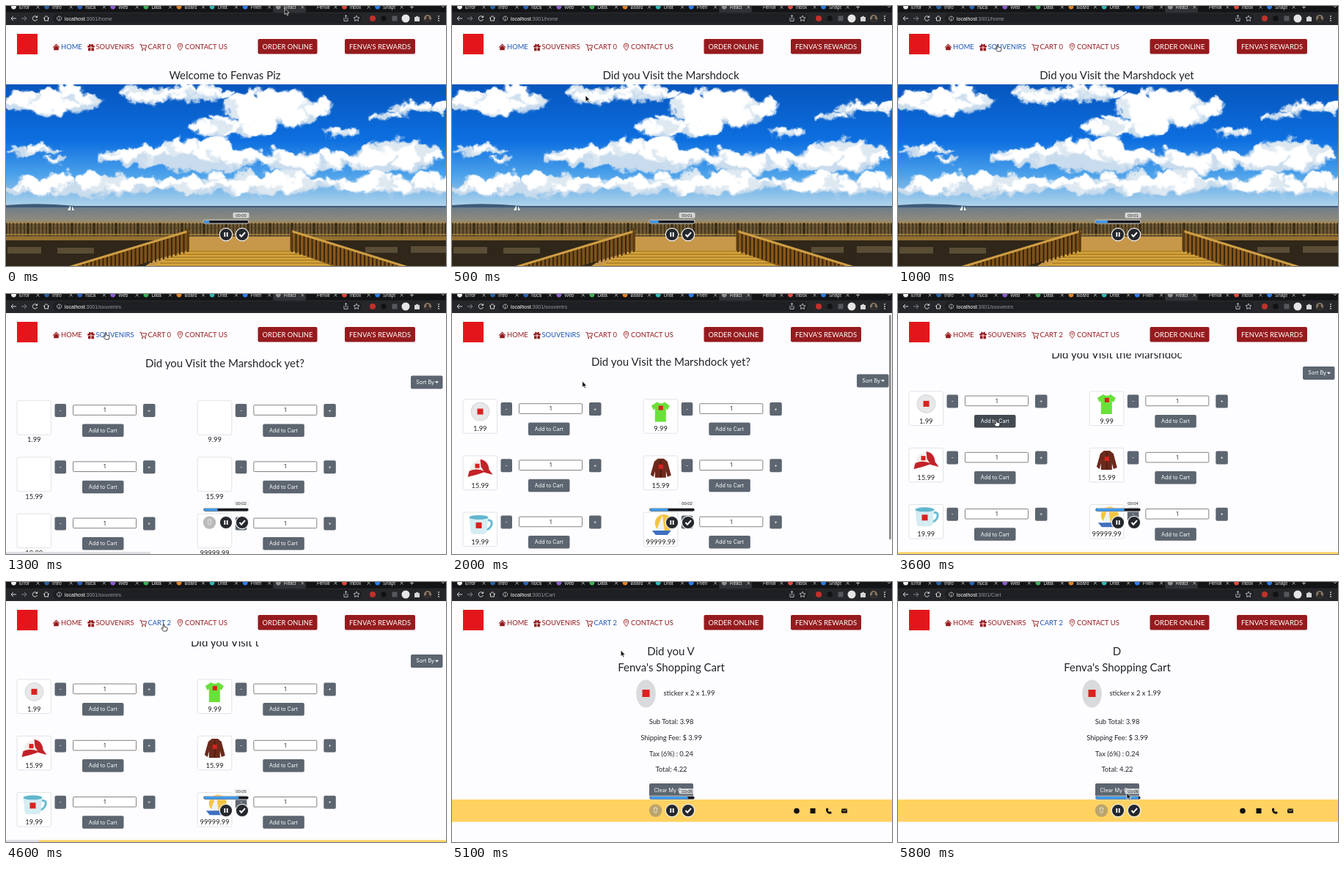
An HTML page that plays this animation: 600x355 px, repeating every 5.9 s.

```html
<!DOCTYPE html>
<html lang="en">
<head>
<meta charset="utf-8">
<title>Pizza shop</title>
<style>
html, body { margin: 0; width: 100%; height: 100%; overflow: hidden; background: #fdfcfe; }
svg { display: block; width: 600px; height: 355px; }
text { font-family: Lato, sans-serif; fill: #212529; white-space: pre; }
.mid { text-anchor: middle; }
.ui { font-family: Inter, "Liberation Sans", sans-serif; }
.bar { font-family: "Liberation Sans", Arial, sans-serif; }
.white { fill: #fff; }
.nav { fill: #951b1e; }
.on { fill: #1d57b4; }
.btn { fill: #5c6570; }
.btn.hover { fill: #434a52; }
</style>
</head>
<body>
<svg id="stage" viewBox="0 0 600 355"></svg>
<script>
const LOOP = 5900, SCROLL = 12.6;
const RED = '#951b1e', YELLOW = '#ffd262';

const rect = (x, y, w, h, fill, more = '') => `<rect x="${x}" y="${y}" width="${w}" height="${h}" fill="${fill}" ${more}/>`;
const circle = (x, y, r, fill, more = '') => `<circle cx="${x}" cy="${y}" r="${r}" fill="${fill}" ${more}/>`;
const oval = (x, y, rx, ry, fill) => `<ellipse cx="${x}" cy="${y}" rx="${rx}" ry="${ry}" fill="${fill}"/>`;
const path = (d, fill, more = '') => `<path d="${d}" fill="${fill}" ${more}/>`;
const line = (d, color, w = 1, more = '') => path(d, 'none', `stroke="${color}" stroke-width="${w}" ${more}`);
const at = (x, y, s, more = '') => `<g transform="translate(${x} ${y})" ${more}>${s}</g>`;
// y is the vertical centre of the capitals
const text = (x, y, size, s, cls = '', more = '') =>
  `<text x="${x}" y="${y + size * .36}" font-size="${size}" class="${cls}" ${more}>${s}</text>`;
const button = (x, y, w, h, s, id = '') =>
  rect(x, y, w, h, '', `rx="2" class="btn" id="${id}"`) + text(x + w / 2, y + h / 2, 7.2, s, 'ui white mid');
const range = n => [...Array(n).keys()];

let seed = 7;
const rnd = () => (seed = seed * 16807 % 2147483647) / 2147483647;

function browser() {
  const tabs = 'Error Intro nuca Web Data Board Untit Frien React Fenva inbox Snaps'.split(' ');
  const icons = '#eee #2a5f9e #2b62b8 #8a5cc9 #3fae5a #d9822b #35b5b0 #2f7cf0 #8d9093 none #e0483e #2c7be5'.split(' ');
  let s = rect(0, 0, 600, 26, '#26272a') + rect(0, 0, 600, 8.5, '#131416');
  s += rect(364, 0, 45, 9, '#303134', 'rx="2"') + '<clipPath id="tab"><rect x="-1" y="-5" width="18" height="15"/></clipPath>';
  tabs.forEach((name, i) => {
    const x = 18 + i * 45.1;
    s += circle(x - 7.5, 1, 3.4, icons[i]);
    s += at(x, 0, text(0, 1.4, 6.4, name, 'bar', 'style="fill:#e2e3e5"'), 'clip-path="url(#tab)"');
    s += line(`M${x + 23.5} -.5l4 4m0 -4l-4 4`, '#d0d1d3', .8);
  });
  s += line('M594 0l2 2 2 -2M551 1.500h5m-2.500 -2.500v5', '#ccc', .8);
  s += rect(64, 10.5, 421, 13, '#1e1f22', 'rx="6.5"');
  const ink = '#d5d6d8';
  s += line('M14 17h-7m3 -3l-3 3 3 3', ink) + line('M21 17h7m-3 -3l3 3 -3 3', '#85878a');
  s += line('M42 15a3.2 3.2 0 1 0 .5 3m.2 -4.8v2.4h-2.4', ink) + line('M51 17l4 -3.5 4 3.5m-6.5 -1v4h5v-4', ink);
  s += line('M72.5 14a3 3 0 1 0 .1 0m0 1.2v1m0 1v2', ink, .8);
  s += line('M461 16v4.5h5v-4.5m-2.5 2v-5.5m-1.7 1.7l1.7 -1.7 1.7 1.7', ink, .8);
  s += line('M478 13l1.2 2.6 2.8 .3 -2.1 1.9 .6 2.8 -2.5 -1.4 -2.5 1.4 .6 -2.8 -2.1 -1.9 2.8 -.3z', ink, .8);
  s += circle(500, 17, 4, '#c4302b') + circle(515, 17, 3.7, '#111214') + rect(526.5, 13.5, 7, 7, '#55585c');
  s += circle(545, 17, 5.5, '#e6e6e6') + path('M557 15h2a1.5 1.5 0 0 1 3 0h2v6h-7z', ink);
  s += circle(575, 17, 5, '#8b7866') + path('M571 20a4 3 0 0 1 8 0a5 5 0 0 1 -8 0', '#302c2a') + circle(575, 15.5, 2, '#302c2a');
  s += range(3).map(i => circle(590, 14 + i * 3, .9, ink)).join('');
  return s + `<text x="80" y="19.8" font-size="7" class="bar white">localhost<tspan id="url" fill="#96999d"></tspan></text>`;
}

function header() {
  const house = path('M-4.7 .2L0 -4.5 4.7 .2 4 1 0 -3 -4 1zM-3.3 1L0 -2.2 3.3 1v3.3h-6.6z', RED);
  const gift = path('M-4.7 -2.5h4.2v2.5h-4.2zM.5 -2.5h4.2v2.5h-4.2zM-4 .8h3.5v3.9h-3.5zM.5 .8h3.5v3.9h-3.5z', RED) +
    line('M0 -2.5C-4 -2.5 -2.5 -6 0 -2.5C2.5 -6 4 -2.5 0 -2.5', RED, 1.1);
  const cart = line('M-4.7 -4h1.8l1.5 5.5h4.8l1.2 -4.3h-7.2', RED, .9) + circle(-.9, 3.5, 1, RED) + circle(3, 3.5, 1, RED);
  const pin = line('M0 4.5C-2 1.8 -3.3 .2 -3.3 -1.5a3.3 3.3 0 0 1 6.6 0C3.3 .2 2 1.8 0 4.5z', RED, .9) + line('M0 -2.8a1.3 1.3 0 1 0 .1 0', RED, .8);
  const link = (x, s, id) => text(x, 56, 9.4, s, 'nav', `id="${id}"`);
  const cta = (x, w, s) => rect(x, 45, w, 20.5, RED, 'rx="2"') + text(x + w / 2, 55.3, 9.4, s, 'mid white');
  return rect(0, 26, 600, 55, '#fdfcfe') + rect(15, 38, 28, 28, '#e3161b') +
    at(68.5, 56, house) + link(75, 'HOME', 'home') + at(116, 56.5, gift) + link(122.5, 'SOUVENIRS', 'souvenirs') +
    at(187, 56.5, cart) + link(193.5, 'CART 0', 'cart') + at(237.5, 56, pin) + link(244, 'CONTACT US', 'contact') +
    cta(343.5, 81, 'ORDER ONLINE') + cta(462, 96, "FENVA'S REWARDS");
}

function sky() {
  // x, y, width, height of each cloud bank
  const banks = [[60, 128, 150, 40], [188, 120, 56, 34], [262, 120, 110, 22], [370, 140, 140, 54], [310, 163, 120, 32],
    [455, 172, 48, 13], [517, 148, 46, 12], [562, 139, 84, 18], [38, 196, 80, 14], [66, 209, 36, 10],
    [100, 243, 230, 34], [330, 242, 260, 34], [530, 242, 190, 32],
    [185, 204, 120, 32], [275, 204, 160, 46], [410, 210, 120, 38], [520, 206, 140, 46]];
  let s = rect(0, 107, 600, 170, 'url(#sky)'), puffs = '';
  for (const [x, y, w, h] of banks) {
    puffs += oval(x, y + h * .12, w * .46, h * .34, '#c9dced');
    for (let i = 0; i < w / 6; i++) {
      const u = rnd() * 2 - 1, round = Math.sqrt(1 - u * u), r = h * (.12 + .14 * rnd()) * (.4 + .6 * round);
      puffs += oval(x + u * w * .47, y + (rnd() - .6) * h * .6 * round, r * 1.9, r, i % 4 ? '#fff' : '#dde8f1');
    }
  }
  return s + `<g filter="url(#fluff)">${puffs}</g>`;
}

function boardwalk() {
  let s = rect(0, 297, 600, 58, '#6e5a36') + rect(0, 320, 600, 35, '#30271a');
  s += path('M0 315H250V320H0zM390 315H600V320H390z', '#94702f');
  s += path('M248 315H390L450 355H190z', '#c7984a') + path('M236 334H408L446 355H202z', '#d7a63a');
  s += range(6).map(i => line(`M${236 - i * 6.5} ${335 + i * 4}H${408 + i * 7}`, '#8f6522')).join('');
  s += range(121).map(i => line(`M${i * 5} 296V314`, '#2f2412', i % 6 ? 1.3 : 3)).join('');
  s += line('M0 295.500H600M0 312H600', '#a8843f', 1.3) + line('M0 303H600', '#57431f');
  s += path('M2 329h46v9h-46zM70 330h50v8h-50zM490 329h44v8h-44zM552 328h48v9h-48z', '#5a4d36');
  s += path('M250 307L90 355H175L250 333z', '#7d531a') + path('M388 307L550 357H450L388 333z', '#85581c');
  s += range(28).map(i => line(`M${248 - i * 5.5} ${309 + i * 1.65}v27M${390 + i * 5.5} ${309 + i * 1.7}v27`, '#36230c', 1.9)).join('');
  return s + line('M250 307L85 357M388 307L552 358', '#cf9e44', 3) + line('M248 304V334M389 305V334', '#5c3d14', 3);
}

function photo() {
  const defs = `<defs><linearGradient id="sky" x2="0" y2="1"><stop stop-color="#0656bd"/><stop offset=".45" stop-color="#0d6fe0"/>
    <stop offset=".72" stop-color="#4aa0ea"/><stop offset="1" stop-color="#b9d8ea"/></linearGradient>
    <linearGradient id="sea" x2="0" y2="1"><stop stop-color="#6d7c88"/><stop offset="1" stop-color="#9c9078"/></linearGradient>
    <filter id="fluff"><feGaussianBlur stdDeviation="1.2" result="soft"/>
    <feTurbulence type="fractalNoise" baseFrequency=".05" numOctaves="4" seed="3"/>
    <feDisplacementMap in="soft" scale="22" xChannelSelector="R" yChannelSelector="G"/></filter>
    <clipPath id="shot"><rect y="107" width="600" height="248"/></clipPath></defs>`;
  const sea = path('M0 276V272Q45 268 95 273L600 273V276H0z', '#3d5a78') + rect(0, 275, 600, 24, 'url(#sea)') +
    path('M88 272v7h-4zM90 273v6h3z', '#f4f4ee');
  return defs + `<g clip-path="url(#shot)">${sky() + sea + boardwalk()}</g>`;
}

const badge = (x = 0, y = 0, r = 4) => rect(x - r, y - r, r * 2, r * 2, '#d8231f');
const goods = [
  circle(0, 0, 13, '#dcdde0') + circle(0, 0, 11.5, '#e7e8ea') + badge(),
  path('M-5 -13Q0 -9 5 -13L12 -8 9 -2 7 -4V14H-8V-4L-10 -2 -13 -8z', '#6ae03a') + badge(0, -5, 3),
  path('M-14 3C-12 -16 10 -16 12 2L17 8Q5 3 -5 8L-17 12Q-17 6 -14 3z', '#f2efed') + path('M0 -12C9 -11 12 -3 12 2L17 9 6 6 1 -2zM-15 4Q-4 -1 7 5L-5 9 -17 12z', '#c32229') + badge(-4, -3, 3),
  path('M-4 -13H4L9 -9 14 10 9 12 7 4V13H-8V4L-10 12 -14 9 -9 -9z', '#6b2a1c') + line('M0 -11V13', '#3d150e') + badge(0, -2, 3),
  line('M9 -6Q18 -7 15 1 13 6 8 7', '#69bcd2', 3) + path('M-15 -10H11L9 9Q8 13 3 13H-8Q-13 13 -13 9z', '#d5edf2') + oval(-2, -10, 13, 3, '#61b6cd') + badge(-2, 1),
  circle(4, -2, 12, '#f4c542') + path('M-6 8L2 -13 5 8z', '#eef2f7') + path('M-12 8H14L9 14H-7z', '#3f6fc0')
];

function shop() {
  const prices = ['1.99', '9.99', '15.99', '15.99', '19.99', '99999.99'];
  const cards = prices.map((price, i) => at(i % 2 * 246.3, Math.floor(i / 2) * 77.2,
    rect(15, 145.7, 46.5, 46.5, '#fff', 'stroke="#dadde1" stroke-width=".8" rx="2"') +
    at(38.5, 162.5, goods[i], 'class="pic"') + text(38.3, 199, 9.4, price, 'mid price') +
    button(66.5, 150, 15.5, 18, '-') + button(187, 150, 16.5, 18, '+', 'plus' + i) + button(104, 177.5, 56.5, 17.5, 'Add to Cart', 'add' + i) +
    rect(91.5, 151.7, 86, 13.6, '#fff', 'stroke="#777" stroke-width=".9" rx="1"') + text(134.5, 158.5, 7.4, '1', 'ui mid', `id="qty${i}"`))).join('');
  return cards + button(552, 111.5, 43.5, 18, 'Sort By  ') + path('M585 119.3h5l-2.5 2.7z', '#fff') + rect(0, 365, 600, 30, YELLOW);
}

function checkout() {
  const rows = ['Sub Total: 3.98', 'Shipping Fee: $ 3.99', 'Tax (6%) : 0.24', 'Total: 4.22'];
  return text(299, 116.5, 15, "Fenva's Shopping Cart", 'mid') +
    oval(264.5, 152.5, 13.3, 19, '#d9dadd') + badge(264.5, 152, 5) +
    text(288.5, 151.5, 9.4, 'sticker x 2 x 1.99') + rows.map((s, i) => text(299, 191 + i * 21.7, 9.4, s, 'mid')).join('') +
    button(269, 275, 60, 18, 'Clear My Cart') + rect(0, 297, 600, 30.5, YELLOW) +
    circle(470, 312.5, 3.8, '#111') + rect(488.5, 309, 7, 7, '#111') +
    path('M510.5 309l1.8 -.5 1.2 2.4 -1.1 1.2 2 2 1.2 -1 2.2 1.4 -.6 1.8C512 318 508.5 312 510.5 309z', '#111') +
    rect(531, 309.5, 8, 6, '#111', 'rx="1"') + line('M531.5 310.5l3.5 2.5 3.5 -2.5', YELLOW, .8);
}

function recorder() {
  const knob = (x, icon) => circle(x, 312, 8.7, '#24272c', 'stroke="#f5f5f5" stroke-width="1.2"') + at(x, 312, icon);
  return rect(309.5, 282, 22, 7.5, '#f4f4f4', 'rx="1.5" opacity=".72"') + text(320.5, 285.8, 5.9, '', 'bar mid', 'id="clock"') +
    rect(269, 292.2, 62, 4.8, '#15181d', 'rx="2.4" stroke="#eee" stroke-width=".9"') + rect(270, 293, 8, 3.2, '#3d9cf0', 'rx="1.5" id="fill"') +
    `<g id="trash">${circle(277.5, 312, 8.7, '#777', 'opacity=".5"')}${line('M274.5 309h6m-5 0l.5 6h3l.5 -6m-3 -1.5h2', '#eee', 1, 'opacity=".7"')}</g>` +
    knob(300, line('M-1.7 -3V3M1.7 -3V3', '#fff', 1.8)) + knob(322, line('M-3.5 0L-1 2.7 4 -2.8', '#fff', 2));
}

const arrow = path('M0 0V8.5L2 6.8 3.4 9.8 4.8 9.2 3.5 6.3H6z', '#111', 'stroke="#fff" stroke-width=".7"');
const hand = path('M-.8 1Q0 -.5 .8 1V4L4.5 5Q5.3 5.3 5 7L4 10H-.5L-3.2 6.5Q-3 5 -.8 6.3z', '#fff', 'stroke="#111" stroke-width=".8"');

document.getElementById('stage').innerHTML =
  rect(0, 0, 600, 355, '#fdfcfe') +
  `<g id="photo">${photo()}</g><g id="shop">${shop()}</g><g id="checkout">${checkout()}</g>` +
  text(298.5, 94.8, 15, '', 'mid', 'id="title"') + header() + browser() +
  rect(0, 352, 197, 3, '#dfe1e5', 'id="status"') + rect(596, 27, 2.8, 307, '#8c8c8c', 'rx="1.4" id="thumb"') +
  recorder() + `<g id="cursor"><g id="arrow">${arrow}</g><g id="hand">${hand}</g></g>`;

const $ = id => document.getElementById(id);
const set = (id, key, value) => $(id).setAttribute(key, value);
const show = (id, on) => set(id, 'display', on ? 'inline' : 'none');
const clamp = x => Math.max(0, Math.min(1, x));
const ease = x => x * x * (3 - 2 * x);
const within = (t, a, b) => t >= a && t < b;

const moves = [[0, 380, 3], [500, 182, 122], [900, 136, 52], [1500, 136, 52], [2300, 197, 150], [2900, 197, 150],
  [3200, 134, 171], [3700, 134, 171], [4400, 215, 57], [4900, 215, 57], [5700, 312, 288], [LOOP, 312, 288]];
function pointer(t) {
  const i = moves.findIndex(m => m[0] > t), [t0, x0, y0] = moves[i - 1], [t1, x1, y1] = moves[i];
  const k = ease((t - t0) / (t1 - t0));
  return [x0 + (x1 - x0) * k, y0 + (y1 - y0) * k];
}

const question = 'Did you Visit the Marshdock yet?';
function heading(t) {
  if (t < 100) return 'Welcome to Fenvas Piz';
  const n = t < 3000 ? 27 + (t - 500) / 125 : 15 - (t - 4600) / 85.5;
  return question.slice(0, Math.max(1, Math.floor(n)));
}

function draw(t) {
  const page = t < 1300 ? 'home' : t < 5000 ? 'souvenirs' : 'Cart';
  const loaded = t >= 1400, scroll = page === 'souvenirs' ? SCROLL * ease(clamp((t - 1900) / 400)) : 0;
  const shift = `translate(0 ${-scroll})`;
  show('photo', page === 'home');
  show('shop', page === 'souvenirs');
  show('checkout', page === 'Cart');
  set('shop', 'transform', shift);
  set('title', 'transform', shift);
  $('title').textContent = heading(t);
  $('url').textContent = ':3001/' + page;

  document.querySelectorAll('.pic').forEach(p => p.setAttribute('display', loaded ? 'inline' : 'none'));
  document.querySelectorAll('.price').forEach(p => p.setAttribute('transform', `translate(0 ${loaded ? -13 : 0})`));
  $('qty0').textContent = within(t, 2800, 3400) ? 2 : 1;
  $('cart').textContent = 'CART ' + (t < 3400 ? 0 : 2);
  const lit = (id, cls, on) => $(id).classList.toggle(cls, on);
  lit('home', 'on', t < 1300);
  lit('souvenirs', 'on', within(t, 900, 2700));
  lit('cart', 'on', t >= 4300);
  lit('plus0', 'hover', within(t, 2200, 3000));
  lit('add0', 'hover', within(t, 3100, 3800));

  show('status', within(t, 1300, 1900) || within(t, 4400, 5000));
  set('status', 'width', t < 1900 ? 197 : 45);
  set('thumb', 'y', 26.5 + scroll);
  set('thumb', 'opacity', within(t, 1900, 3000) ? clamp((3000 - t) / 300) : 0);

  $('clock').textContent = '00:0' + Math.floor((t + 750) / 1000);
  set('fill', 'width', 7.5 + t / 5800 * 50.5);
  show('trash', page === 'Cart' || page === 'souvenirs' && !loaded);

  const [x, y] = pointer(t);
  const linked = [[900, 1600], [2200, 3000], [3100, 3800], [4300, 5000]].some(([a, b]) => within(t, a, b));
  set('cursor', 'transform', `translate(${x} ${y})`);
  show('hand', linked);
  show('arrow', !linked);
}

const start = performance.now();
function tick() {
  const t = (performance.now() - start) % LOOP;
  draw(Math.floor(t / 100) * 100);
  requestAnimationFrame(tick);
}
tick();
</script>
</body>
</html>
```
